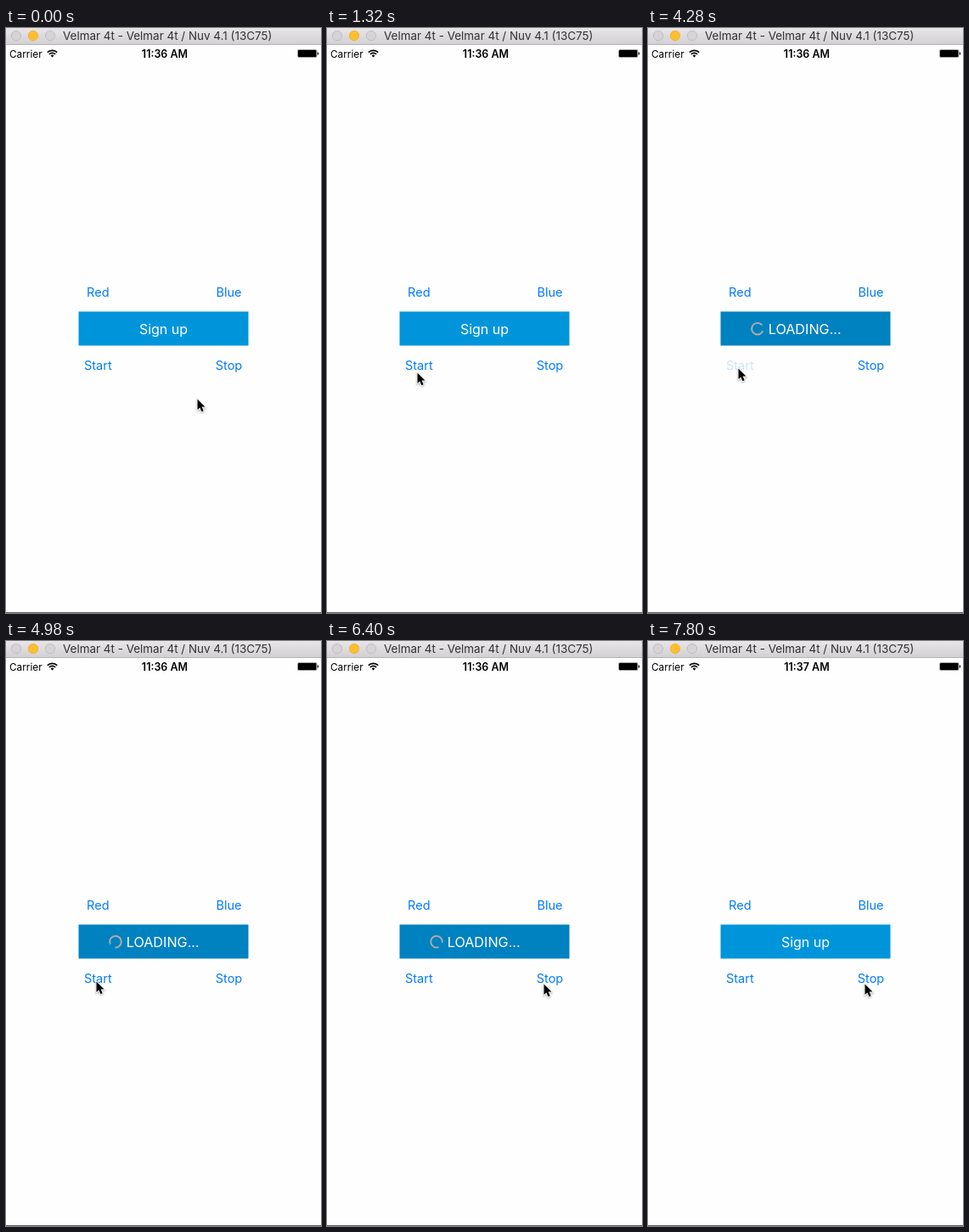
Animation, 371 px wide and 688 px high, one loop 8 s. Source, as an HTML page:

```html
<!DOCTYPE html>
<html lang="en">
<head>
<meta charset="utf-8">
<title>Loading button</title>
<style>
  html, body { margin: 0; width: 100%; height: 100%; overflow: hidden; background: #fefefe; }
  svg { display: block; width: 100vw; height: 100vh; }
  text { font-family: Inter, Roboto, "Liberation Sans", sans-serif; }
  .mid { text-anchor: middle; }
  .link { font-size: 14.5px; fill: #007aff; }
  .label { font-size: 16px; fill: #fff; }
</style>
</head>
<body>
<svg viewBox="0 0 371 688">
  <defs>
    <linearGradient id="bar" x2="0" y2="1">
      <stop offset="0" stop-color="#e8e6e8"/>
      <stop offset="1" stop-color="#d2d0d2"/>
    </linearGradient>
    <filter id="soft" x="-50%" y="-50%" width="200%" height="200%">
      <feGaussianBlur stdDeviation="0.8"/>
    </filter>
    <path id="arrow" d="M0 0V12.6L2.9 9.9L4.9 14.7L7.2 13.7L5.1 9.1H9Z"/>
  </defs>

  <rect width="371" height="688" fill="#fefefe"/>
  <rect width="371" height="19" fill="url(#bar)"/>
  <rect y="19" width="371" height="1" fill="#b6b4b6"/>
  <g stroke-width="0.8">
    <circle cx="12" cy="9" r="5.7" fill="#d5d3d5" stroke="#bbb9bb"/>
    <circle cx="32" cy="9" r="5.7" fill="#fdbe2f" stroke="#eeb02c"/>
    <circle cx="52" cy="9" r="5.7" fill="#d5d3d5" stroke="#bbb9bb"/>
  </g>
  <text x="67" y="14" font-size="13.45" fill="#333">Velmar 4t - Velmar 4t / Nuv 4.1 (13C75)</text>

  <text x="4" y="34.5" font-size="11.8">Carrier</text>
  <g fill="none" stroke="#000" stroke-width="1.7">
    <path d="M48.8 28.7A8 8 0 0 1 60.2 28.7"/>
    <path d="M50.9 30.9A5 5 0 0 1 58.1 30.9"/>
  </g>
  <path d="M52.6 32.4A2.9 2.9 0 0 1 56.4 32.4L54.5 34.6Z"/>
  <text id="clock" class="mid" x="187" y="34.5" font-size="12.5" font-weight="600"></text>
  <rect x="343.5" y="25.5" width="22.5" height="9" rx="1.5" fill="none" stroke="#000" stroke-width="0.6" opacity="0.6"/>
  <rect x="344" y="26" width="21.5" height="8" rx="0.8"/>
  <path d="M366.8 28.3A1.8 1.8 0 0 1 366.8 31.8Z"/>

  <text class="link mid" x="108.3" y="316">Red</text>
  <text class="link mid" x="262.5" y="316">Blue</text>
  <rect id="button" x="85.5" y="333.5" width="200" height="40"/>
  <text id="signUp" class="label mid" x="185.5" y="360">Sign up</text>
  <g id="loading">
    <circle id="ring" cx="129" cy="353.7" r="6.8" fill="none" stroke="#aaa" stroke-width="2"
      pathLength="360" stroke-dasharray="300 60"/>
    <text class="label" x="141.7" y="360" style="font-size: 16.2px">LOADING...</text>
  </g>
  <text id="start" class="link mid" x="108.3" y="402">Start</text>
  <text id="stop" class="link mid" x="262.5" y="402">Stop</text>
  <rect y="687" width="371" height="1" fill="#5e5e5e"/>

  <g id="cursor">
    <use href="#arrow" y="1" fill="#000" stroke="#000" stroke-width="1.6" opacity="0.35" filter="url(#soft)"/>
    <use href="#arrow" fill="#000" stroke="#fff" stroke-width="1.8" stroke-linejoin="round" paint-order="stroke"/>
  </g>
</svg>
<script>
  const LOOP = 8000, TICK = 56.67;
  const LOAD = 4280, DONE = 7510, MINUTE = 7100;
  const SPIN = 1850, GAP_START = -8, GAP = 60;

  // Each move: start, end, number of steps, then cubic control points.
  const moves = [
    [590, 970, 6, [226, 437], [170, 405], [90, 383], [74, 400]],
    [1150, 1320, 4, [74, 400], [85, 402], [98, 404], [107, 406]],
    [2310, 2510, 4, [107, 406], [107, 404], [107, 402], [107, 401]],
    [5150, 5610, 9, [107, 401], [140, 440], [222, 437], [256, 404]]
  ];

  const el = id => document.getElementById(id);
  const set = (id, name, value) => el(id).setAttribute(name, value);
  const clamp = v => Math.min(1, Math.max(0, v));
  const smooth = u => u * u * (3 - 2 * u);

  function stepped(t, from, to, count) {
    if (t < from) return 0;
    const gap = (to - from) / (count - 1);
    return clamp((Math.floor((t - from) / gap + 1e-6) + 1) / count);
  }

  function bezier(u, a, b, c, d) {
    const v = 1 - u;
    return a.map((p, i) =>
      v * v * v * p + 3 * v * v * u * b[i] + 3 * v * u * u * c[i] + u * u * u * d[i]);
  }

  function cursorAt(t) {
    const [from, to, count, ...points] = moves.filter(m => t >= m[0]).pop() || moves[0];
    return bezier(smooth(stepped(t, from, to, count)), ...points);
  }

  // A tapped title dims at once and recovers in five steps.
  function tapOpacity(t, at) {
    return t < at ? 1 : 0.2 + 0.8 * clamp(Math.floor((t - at) / 58) / 5);
  }

  function draw(t) {
    const busy = t >= LOAD && t < DONE;
    set("button", "fill", busy ? "#0081c0" : "#0095db");
    set("signUp", "visibility", busy ? "hidden" : "visible");
    set("loading", "visibility", busy ? "visible" : "hidden");

    const spun = Math.floor((t - LOAD) / TICK) * TICK;
    const angle = GAP_START + GAP / 2 + 360 * spun / SPIN;
    set("ring", "transform", `rotate(${angle} 129 353.7)`);

    set("start", "opacity", tapOpacity(t, LOAD));
    set("stop", "opacity", tapOpacity(t, DONE));
    el("clock").textContent = t < MINUTE ? "11:36 AM" : "11:37 AM";

    const [x, y] = cursorAt(t).map(v => Math.round(v) - 0.5);
    set("cursor", "transform", `translate(${x} ${y})`);
  }

  function frame() {
    draw(performance.now() % LOOP);
    requestAnimationFrame(frame);
  }
  frame();
</script>
</body>
</html>
```
